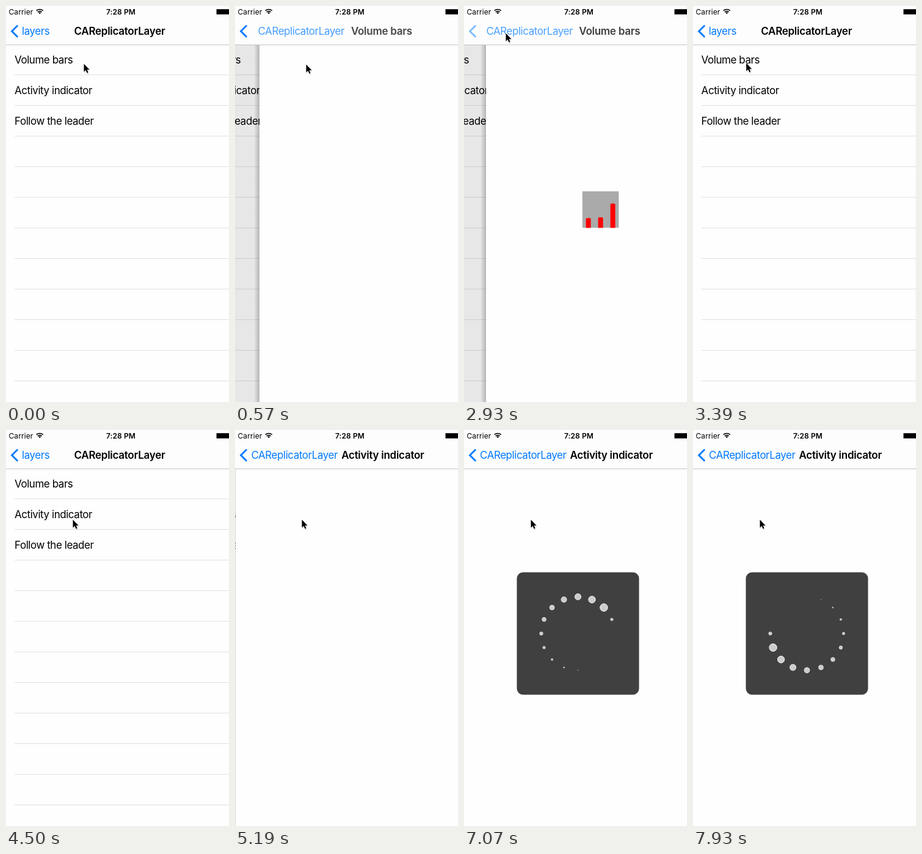
These frames come from a looping animation (365x647 px, 7990 ms). An HTML page:

```html
<!DOCTYPE html>
<html lang="en">
<head>
<meta charset="utf-8">
<title>Replicator layers</title>
<style>
html, body { margin: 0; width: 100%; height: 100%; overflow: hidden; background: #fefefe; }
svg { display: block; width: 365px; height: 647px; }
text { font: 400 17px Inter, Roboto, sans-serif; letter-spacing: -0.45px; }
.title { font-weight: 600; letter-spacing: -0.27px; }
.blue { fill: #007aff; }
.status { font-size: 12px; letter-spacing: 0.1px; }
.stroke { fill: none; stroke: #000; }
</style>
</head>
<body>
<svg viewBox="0 0 365 647">
  <defs>
    <linearGradient id="edge">
      <stop offset="0" stop-opacity="0"/>
      <stop offset="1" stop-opacity=".22"/>
    </linearGradient>
    <clipPath id="panel"><rect x="156.5" y="302.5" width="60" height="60"/></clipPath>
  </defs>

  <g id="list">
    <rect x="-1" width="375" height="647" fill="#fefefe"/>
    <text x="14" y="94">Volume bars</text>
    <text x="14" y="144">Activity indicator</text>
    <text x="14" y="194">Follow the leader</text>
  </g>
  <rect id="shade" width="365" height="647"/>

  <g id="page">
    <rect x="-10" width="9" height="647" fill="url(#edge)"/>
    <rect x="-1" width="376" height="647" fill="#fefefe"/>
    <g id="volume" clip-path="url(#panel)">
      <rect x="156.5" y="302.5" width="60" height="60" fill="#aaa"/>
    </g>
    <g id="activity">
      <rect x="86.5" y="232.5" width="200" height="200" rx="10" fill="#404040"/>
    </g>
  </g>

  <rect width="365" height="63" fill="#fdfdfd"/>
  <rect y="63" width="365" height="1" fill="#c4c4c6"/>
  <text class="status" x="4.5" y="14">Carrier</text>
  <text class="title status" x="164" y="14">7:28 PM</text>
  <g class="stroke" stroke-width="1.6">
    <path d="M49.6 7.7Q55.2 3.4 60.8 7.7M51.7 10Q55.2 7.2 58.7 10"/>
    <path d="M53.2 10.9Q55.2 9.6 57.2 10.9L55.2 13.2Z" fill="#000" stroke="none"/>
  </g>
  <rect x="344.5" y="5.2" width="21" height="8.5"/>
  <path id="chevron" class="stroke" style="stroke:#007aff" stroke-width="2.8" d="M19.2 31.7L9.6 41.2L19.2 50.7"/>
  <text id="oldBack" class="blue" y="47">layers</text>
  <text id="oldTitle" class="title" y="47">CAReplicatorLayer</text>
  <text id="back" class="blue" y="47">CAReplicatorLayer</text>
  <text id="title" class="title" y="47"></text>

  <g id="cursor">
    <path d="M1 2V15.5L4 12.7L6.2 17.4L8.4 16.4L6.3 12H10.3Z" opacity=".2"/>
    <path d="M.5 .5V13.5L3.5 10.8L5.6 15.4L7.6 14.5L5.6 10H9.6Z" stroke="#fff" stroke-width="1.2" paint-order="stroke"/>
  </g>
</svg>
<script>
const LOOP = 7990, WIDTH = 375, DOTS = 16;
const PUSH_1 = 335, POP = 2898, PUSH_2 = 4718;
const BARS_START = 775, DOTS_START = 5239, DOT_STEP = 95;

const el = id => document.getElementById(id);
const clamp = v => Math.max(0, Math.min(1, v));

function add(parent, tag, attrs) {
  const node = document.createElementNS('http://www.w3.org/2000/svg', tag);
  set(node, attrs);
  return parent.appendChild(node);
}
function set(node, attrs) {
  for (const key in attrs) node.setAttribute(key, attrs[key]);
}
const place = (id, x, opacity) => set(el(id), { x, opacity });

// Linear interpolation through [time, ...values] keys.
function track(keys, t) {
  let i = 0;
  while (i < keys.length - 2 && t >= keys[i + 1][0]) i++;
  const [a, b] = [keys[i], keys[i + 1]];
  const f = clamp((t - a[0]) / (b[0] - a[0]));
  return a.slice(1).map((v, k) => v + (b[k + 1] - v) * f);
}

const cursorKeys = [
  [50, 127, 94], [110, 116, 95], [600, 116, 95], [1130, 105, 148], [1450, 105, 148],
  [1950, 67, 56], [2300, 68, 44], [2960, 68, 44], [3560, 94, 112], [3950, 98, 180],
  [4300, 103, 176], [4440, 105, 163], [4500, 109, 146]
];
const pressKeys = [[2690, 1], [2740, .3], [2870, .3], [2930, .5], [3030, 1]];

for (let y = 112; y < 647; y += 50)
  add(el('list'), 'rect', { x: 14, y, width: 361, height: 1, fill: '#e1e1e3' });

const bars = [0, 1, 2].map(i =>
  add(el('volume'), 'rect', { x: 162.5 + 20 * i, width: 8, height: 45, rx: 2, fill: '#f00' }));

const dots = Array.from({ length: DOTS }, (_, i) => {
  const a = i * 2 * Math.PI / DOTS;
  return add(el('activity'), 'circle', {
    cx: 186.5 + 60 * Math.sin(a), cy: 332.5 - 60 * Math.cos(a), fill: '#ccc', stroke: '#fff'
  });
});

// Critically damped spring, 0 to 1.
function spring(ms) {
  if (ms <= 0) return 0;
  const x = ms * .016;
  return x > 12 ? 1 : 1 - (1 + x) * Math.exp(-x);
}

function barRise(seconds) {
  if (seconds < 0) return 0;
  return 1 - Math.abs(2 * (seconds % 1) - 1);
}

function dotScale(age) {
  if (age < 0) return 0;
  age %= DOTS;
  return age < .8 ? age / .8 : clamp(1 - (age - .8) / 11.6);
}

function draw(t) {
  const second = t >= PUSH_2;
  const shown = second ? spring(t - PUSH_2) : spring(t - PUSH_1) - spring(t - POP);
  const rest = 1 - shown;
  const fade = clamp(2.5 * shown - 1.5);
  const [press] = track(pressKeys, t);

  set(el('list'), { transform: `translate(${-.3 * WIDTH * shown})` });
  set(el('shade'), { opacity: .1 * shown });
  set(el('page'), { transform: `translate(${WIDTH * rest})` });

  set(el('chevron'), { opacity: press });
  place('oldBack', 26 - 60 * shown, clamp(1 - 2.5 * shown));
  place('oldTitle', 111.5 - 86 * shown, clamp(1 - 1.6 * shown));
  place('back', 26 + 105 * rest, Math.min(fade, press + .2));
  place('title', 173.5 + 150 * rest, fade);
  el('title').textContent = second ? 'Activity indicator' : 'Volume bars';

  el('volume').style.display = !second && t >= BARS_START ? '' : 'none';
  bars.forEach((bar, i) =>
    set(bar, { y: 357.5 - 35 * barRise((t - BARS_START) / 1000 - .33 * i) }));

  el('activity').style.display = t >= DOTS_START ? '' : 'none';
  dots.forEach((dot, i) => {
    const s = dotScale((t - DOTS_START) / DOT_STEP - i);
    set(dot, { r: 6.5 * s, 'stroke-width': s });
  });

  set(el('cursor'), { transform: `translate(${track(cursorKeys, t)})` });
}

function frame() {
  draw(performance.now() % LOOP);
  requestAnimationFrame(frame);
}
frame();
</script>
</body>
</html>
```
